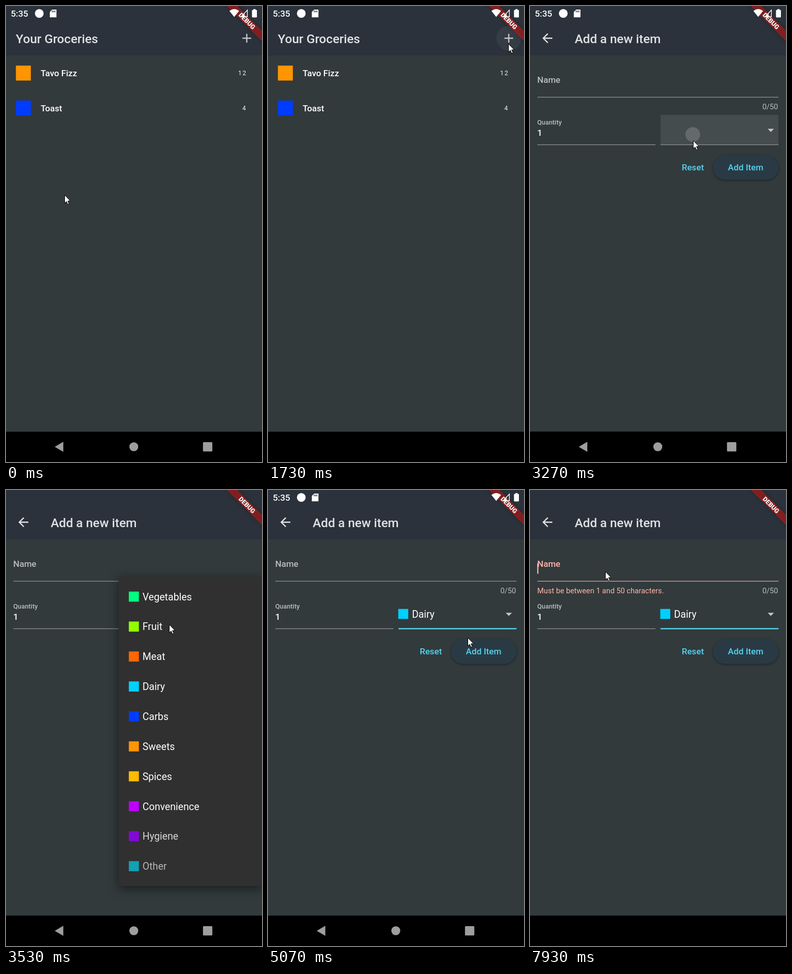
An HTML page with a canvas that plays this animation: 504x896 px, repeating every 8000 ms.

```html
<!DOCTYPE html>
<html lang="en">
<head>
<meta charset="utf-8">
<title>Grocery list</title>
<style>
html, body { margin: 0; width: 100%; height: 100%; overflow: hidden; background: #000; }
canvas { display: block; width: 504px; height: 896px; }
</style>
</head>
<body>
<canvas id="stage" width="504" height="896"></canvas>
<script>
const c = document.getElementById('stage').getContext('2d');
const W = 504, NAV_Y = 836.5, LOOP = 8000, DP = 1.2259;
const BG = '#323a3c', BAR = '#2b323b', TITLE = '#dfe2e4', MUTED = '#b9bebf';
const LINE = '#8d9394', PRIMARY = '#54d3f0', ERROR = '#ffb4ab', DAIRY = '#00d0ff';
const CATEGORIES = [
  ['Vegetables', '#00ff80'], ['Fruit', '#91ff00'], ['Meat', '#ff6600'], ['Dairy', DAIRY],
  ['Carbs', '#003cff'], ['Sweets', '#ff9500'], ['Spices', '#ffbb00'],
  ['Convenience', '#bf00ff'], ['Hygiene', '#9500ff'], ['Other', '#00e1ff']
];
// pointer path: time, x, y
const POINTER = [
  [133, 115, 371], [1000, 418, 102], [1470, 473, 74], [1800, 473, 74],
  [2067, 344, 148], [3200, 321, 264], [3533, 321, 264], [4133, 289, 388],
  [4533, 289, 388], [5067, 393, 290], [5200, 393, 290], [5400, 403, 319],
  [6867, 403, 319], [7533, 148, 160]
];
// spans in which the system icons are hidden
const STATUS_OFF = [[1860, 2790], [3460, 3730], [4730, 4995], [7925, 8000]];
const NAV_OFF = [[1725, 2460], [3330, 3530], [4395, 4860], [6725, 7130], [7925, 8000]];

let t = 0;
const ramp = (a, b) => Math.min(1, Math.max(0, (t - a) / (b - a)));
const easeOut = p => 1 - (1 - p) ** 3;
const within = spans => spans.some(([a, b]) => t >= a && t < b);

function rect(x, y, w, h, color) {
  c.fillStyle = color;
  c.fillRect(x, y, w, h);
}
function disc(x, y, r, color) {
  c.fillStyle = color;
  c.beginPath();
  c.arc(x, y, r, 0, 7);
  c.fill();
}
function round(x, y, w, h, r, color) {
  c.fillStyle = color;
  c.beginPath();
  c.roundRect(x, y, w, h, r);
  c.fill();
}
function poly(points, color) {
  c.fillStyle = color;
  c.beginPath();
  points.forEach(([x, y]) => c.lineTo(x, y));
  c.closePath();
  c.fill();
}
function text(s, x, y, size, color, weight = 400, align = 'left') {
  c.font = `${weight} ${size * DP}px Roboto, sans-serif`;
  c.textAlign = align;
  c.fillStyle = color;
  c.fillText(s, x, y);
}
function scoped(draw) {
  c.save();
  draw();
  c.restore();
}
function shadow(blur, dy, alpha) {
  c.shadowColor = `rgba(0,0,0,${alpha})`;
  c.shadowBlur = blur;
  c.shadowOffsetY = dy;
}

function page() {
  rect(0, 0, W, NAV_Y, BG);
  rect(0, 0, W, 97, BAR);
}

function listRow(name, count, color, y) {
  rect(19.5, y - 14.7, 29.4, 29.4, color);
  text(name, 68.2, y + 6.2, 14, '#fff', 500);
  scoped(() => {
    c.letterSpacing = 1.5 * DP + 'px';
    text(count, count.length > 1 ? 457 : 465.3, y + 4.3, 10, '#f2f3f3');
  });
}

function listPage() {
  page();
  text('Your Groceries', 19.3, 72.5, 20, TITLE, 500);
  if (t >= 1660) disc(474, 63.3, 14 + 10.5 * ramp(1600, 1725), 'rgba(255,255,255,.05)');
  rect(465.4, 62.1, 17.2, 2.4, '#c6c9cc');
  rect(472.8, 54.7, 2.4, 17.2, '#c6c9cc');
  listRow('Tavo Fizz', '12', '#ff9500', 131.8);
  listRow('Toast', '4', '#003cff', 200.5);
}

function dropdown() {
  const picked = t >= 4590, focus = t >= 3330;
  const x = 256.9, w = 232.4;
  const press = t >= 3190 ? 1 - ramp(3400, 3600) : 0;
  if (press) scoped(() => {
    c.beginPath();
    c.rect(x, 214, w, 58.5);
    c.clip();
    rect(x, 214, w, 59, `rgba(255,255,255,${.09 * press})`);
    const grow = ramp(3270, 3500);
    disc(320.5 + 52 * grow, 252.5 - 9 * grow, 8 + 6.5 * ramp(3200, 3265) + 110 * grow,
      `rgba(255,255,255,${.17 * press})`);
  });
  if (picked) {
    rect(256.5, 233.7, 19.6, 19.6, DAIRY);
    text('Dairy', 283.4, 250.6, 16, '#fff');
  }
  poly([[468, 241.2], [480.3, 241.2], [474.1, 247.4]], '#c3c7c8');
  if (focus) rect(x, 271.3, w, 2.4, PRIMARY);
  else rect(x, 271.9, w, 1.3, LINE);
}

function buttons() {
  text('Reset', 298.7, 323.2, 14, PRIMARY, 500);
  scoped(() => {
    shadow(4, 1.5, .4);
    round(360.5, 293, 128.8, 48.5, 24.3, '#2a3a44');
  });
  const press = t >= 6725 ? 1 - ramp(6870, 7130) : 0;
  if (press) round(360.5, 293, 128.8, 48.5, 24.3, `rgba(84,211,240,${.05 * press})`);
  text('Add Item', 389.6, 323.2, 14, PRIMARY, 500);
}

function formPage() {
  page();
  scoped(() => {
    c.translate(34.2 - 12 * DP, 63.3 - 12 * DP);
    c.scale(DP, DP);
    c.fillStyle = TITLE;
    c.fill(new Path2D('M20 11H7.83l5.59-5.59L12 4l-8 8 8 8 1.41-1.41L7.83 13H20z'));
  });
  text('Add a new item', 88, 72.5, 20, TITLE, 500);

  const invalid = t >= 6925;
  text('Name', 14.2, 151.2, 14, invalid ? ERROR : MUTED, 500);
  if (t >= 7925) rect(14.2, 144, 2.3, 20.5, ERROR);
  rect(14.5, 178.6, 474.8, 1.3, invalid ? '#e0a49d' : LINE);
  if (invalid) scoped(() => {
    const p = ramp(6867, 7067);
    c.globalAlpha = p;
    text('Must be between 1 and 50 characters.', 14.2, 202.6 - 4 * (1 - p), 12, ERROR);
  });
  text('0/50', 488.3, 202.6, 12, MUTED, 400, 'right');

  text('Quantity', 14.2, 233, 10.5, MUTED, 500);
  text('1', 14.2, 255.2, 14, '#fff', 500);
  rect(14.5, 271.9, 232.5, 1.3, LINE);
  dropdown();
  buttons();
}

function menu() {
  if (t < 3390 || t >= 4800) return;
  const top = 170.5, step = 58.85;
  const height = step + 20 + (607.5 - step - 20) * easeOut(ramp(3400, 3490));
  const fade = Math.min(ramp(3330, 3410), 1 - ramp(4590, 4800));
  scoped(() => {
    c.globalAlpha = fade;
    scoped(() => {
      shadow(20, 5, .5);
      round(221.8, top, 282.5, height, 2.5, '#303030');
    });
    c.beginPath();
    c.rect(221.8, top, 282.2, height);
    c.clip();
    if (t >= 4460) rect(221.8, 356.5, 282.2, step, 'rgba(255,255,255,.1)');
    CATEGORIES.forEach(([name, color], i) => {
      const y = 209.4 + i * step;
      c.globalAlpha = fade * ramp(3400 + i * 10, 3450 + i * 12);
      rect(241.8, y - 9.8, 19.8, 19.8, color);
      text(name, 268.7, y + 7.2, 16, '#fff');
    });
  });
}

function banner() {
  scoped(() => {
    c.beginPath();
    c.rect(0, 0, W, NAV_Y);
    c.clip();
    c.translate(W, 0);
    c.rotate(Math.PI / 4);
    scoped(() => {
      shadow(7, 0, .45);
      rect(-60, 34.3, 120, 14.7, 'rgba(183,28,28,.64)');
    });
    text('DEBUG', 0, 46.1, 10.2, '#fff', 900, 'center');
  });
}

function statusIcons() {
  const white = '#fff';
  text('5:35', 9.4, 21, 14.2, white, 500);
  disc(65.5, 14.6, 8.6, white);
  poly([[91, 7], [99.3, 7], [99.3, 22.3], [86.3, 22.3], [86.3, 11.7]], white);
  for (let i = 0; i < 3; i++) rect(90.2 + i * 2.7, 9, 1.4, 3.4, BAR);
  c.fillStyle = white;
  c.beginPath();
  c.moveTo(449.3, 21.5);
  c.lineTo(439.8, 9.8);
  c.quadraticCurveTo(449.3, 2.2, 458.8, 9.8);
  c.fill();
  c.strokeStyle = white;
  c.lineWidth = 1.4;
  c.beginPath();
  c.moveTo(475.2, 8);
  c.lineTo(475.2, 21.3);
  c.lineTo(462.5, 21.3);
  c.closePath();
  c.stroke();
  poly([[469.5, 14], [469.5, 22], [461.5, 22]], white);
  round(484.3, 7.8, 9.7, 14.6, 1.3, white);
  rect(487, 6, 4.3, 2.5, white);
}

function navIcons() {
  const gray = '#9e9e9e';
  poly([[96, 866.2], [112.8, 856.3], [112.8, 876.1]], gray);
  disc(251.6, 866, 8.8, gray);
  round(387.8, 857, 18.4, 18.2, 1.5, gray);
}

// monotone cubic through the pointer keys, at rest on every hold
function pointerAt() {
  const n = POINTER.length - 1;
  if (t <= POINTER[0][0]) return POINTER[0].slice(1);
  if (t >= POINTER[n][0]) return POINTER[n].slice(1);
  const i = POINTER.findIndex(k => k[0] > t) - 1;
  const a = POINTER[i], b = POINTER[i + 1], d = b[0] - a[0], p = (t - a[0]) / d;
  return [1, 2].map(j => {
    const slope = k => k < 0 || k >= n ? 0
      : (POINTER[k + 1][j] - POINTER[k][j]) / (POINTER[k + 1][0] - POINTER[k][0]);
    const tangent = k => {
      const u = slope(k - 1), v = slope(k);
      return u * v > 0 ? 2 * u * v / (u + v) : 0;
    };
    const s = p * p * (3 - 2 * p);
    return a[j] + (b[j] - a[j]) * s
      + d * (tangent(i) * p * (1 - p) ** 2 - tangent(i + 1) * p * p * (1 - p));
  });
}

function pointer() {
  const [x, y] = pointerAt();
  scoped(() => {
    c.translate(Math.round(x) + .5, Math.round(y) + .5);
    poly([[0, 0], [0, 16], [3.6, 12.6], [6.2, 18.4], [8.7, 17.3], [6.2, 11.6], [11.2, 11.6]], '#fff');
    c.strokeStyle = '#000';
    c.lineWidth = 1;
    c.stroke();
  });
}

function pages() {
  const p = ramp(1800, 2060);
  if (p < 1) listPage();
  if (p > 0) scoped(() => {
    const s = .85 + .15 * easeOut(p);
    c.beginPath();
    c.rect(0, 0, W, NAV_Y);
    c.clip();
    c.globalAlpha = Math.min(1, p * 2);
    c.translate(W / 2, NAV_Y / 2);
    c.scale(s, s);
    c.translate(-W / 2, -NAV_Y / 2);
    if (p < 1) {
      // blend the page as a whole before its details
      page();
      c.globalAlpha = 1;
      if (p > .4) formPage();
    } else formPage();
  });
}

function draw(now) {
  // the screen refreshes 15 times a second
  t = Math.floor((now % LOOP + 4) * .015) / .015;
  rect(0, 0, W, 896, '#000');
  pages();
  menu();
  banner();
  if (!within(STATUS_OFF)) statusIcons();
  if (!within(NAV_OFF)) navIcons();
  pointer();
}

const start = performance.now();
function tick() {
  draw(performance.now() - start);
  requestAnimationFrame(tick);
}
tick();
</script>
</body>
</html>
```
